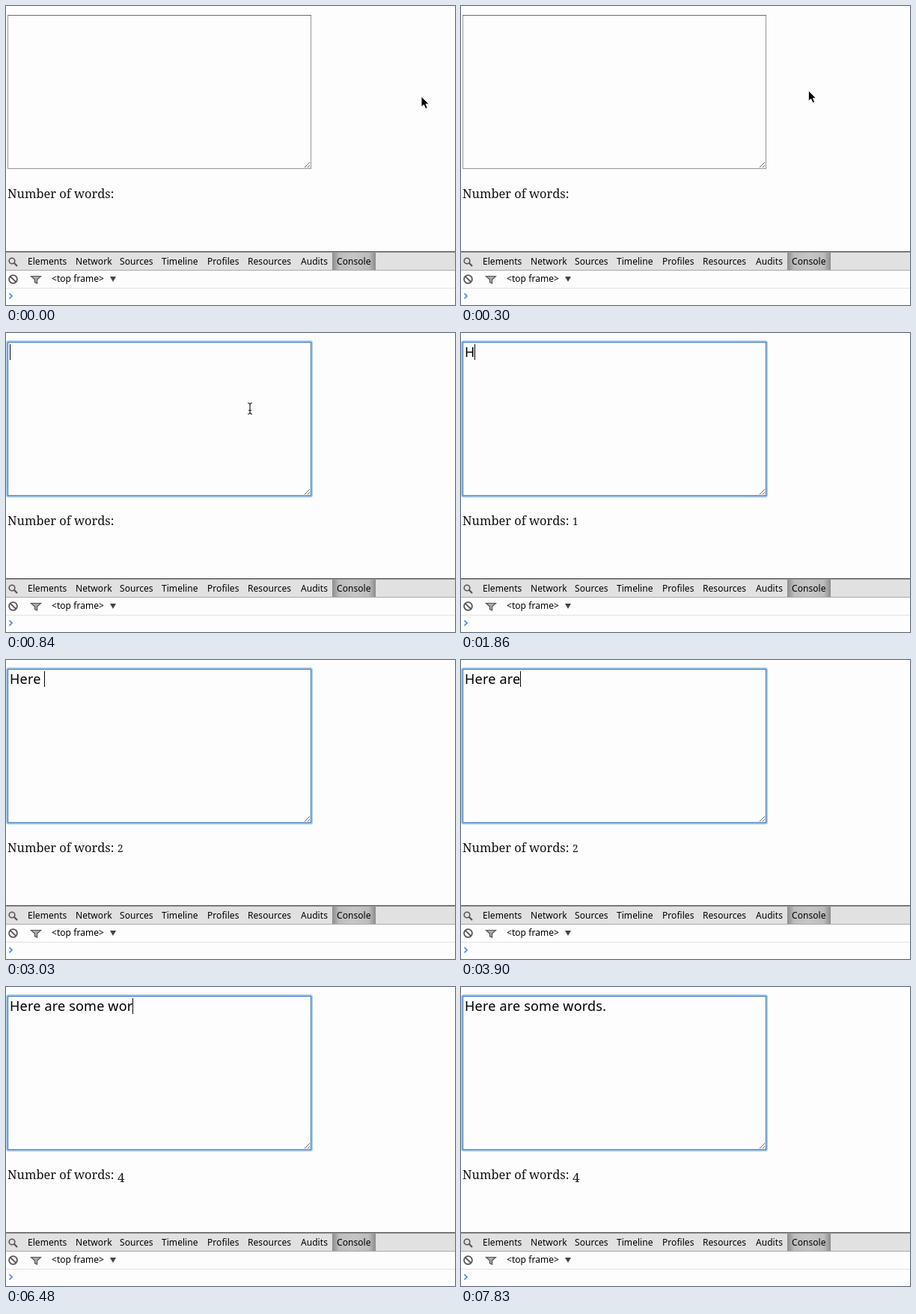
An HTML page for the animation above (8 s loop, 600 px wide and 400 px high).

```html
<!DOCTYPE html>
<html lang="en">
<head>
<meta charset="utf-8">
<title>Word counter</title>
<style>
  html, body { margin: 0; width: 100%; height: 100%; overflow: hidden; background: #fdfdfd; }
  svg { position: absolute; left: 0; top: 0; width: 600px; height: 400px; display: block; }
  text { white-space: pre; fill: #000; }
  .ui { font: 12px "Noto Sans", sans-serif; letter-spacing: .05px; }
  .typed { font: 18px "Noto Sans", sans-serif; letter-spacing: .2px; }
  .label { font: 16.4px "Noto Serif", serif; fill: #111; }
</style>
</head>
<body>
<svg viewBox="0 0 600 400">
  <defs>
    <linearGradient id="tab">
      <stop offset="0" stop-color="#8c8c8c"/>
      <stop offset=".16" stop-color="#bdbdbd"/>
      <stop offset=".5" stop-color="#c6c6c6"/>
      <stop offset=".84" stop-color="#bdbdbd"/>
      <stop offset="1" stop-color="#8c8c8c"/>
    </linearGradient>
  </defs>

  <g fill="none">
    <g id="plain">
      <rect x="2.5" y="12.5" width="405" height="205" stroke="#959595"/>
      <path d="M2 12.5H408" stroke="#6c6c6c"/>
    </g>
    <g id="focus">
      <rect x="1.5" y="11.5" width="407" height="207" rx="2" stroke="#a9c8ea" stroke-width="3"/>
      <rect x="2.5" y="12.5" width="405" height="205" stroke="#4f87c2" stroke-width="1.3"/>
    </g>
    <path d="M399 216L406 209M403 216L406 213" stroke="#666"/>
  </g>

  <text id="typed" class="typed" x="5" y="32"></text>
  <path id="caret" d="M.5 15V36" stroke="#000"/>

  <text class="label" x="2" y="257">Number of words:</text>
  <text id="count" class="label" x="149"></text>

  <rect y="329" width="600" height="24" fill="#e2e1e2"/>
  <path d="M0 328.8H600" stroke="#565656" stroke-width="1.6"/>
  <path d="M0 353.5H600" stroke="#a8a8a8"/>
  <path d="M0 377.5H600" stroke="#e2e2e2"/>
  <rect x="436" y="330" width="58" height="23" fill="url(#tab)"/>
  <g id="tabs" class="ui"></g>
  <text class="ui" x="61" y="369">&lt;top frame&gt;</text>
  <path d="M139 362H147L143 369Z" fill="#444"/>

  <g fill="none" stroke="#555">
    <circle cx="8" cy="341" r="3.8" stroke-width="1.6"/>
    <path d="M10.8 343.8L15 348" stroke-width="2.2"/>
    <circle cx="9.5" cy="365.5" r="5.4" stroke-width="1.8"/>
    <path d="M5.8 361.8L13.2 369.2" stroke-width="1.8"/>
    <path d="M33.5 361.5H46.5L41.6 366V371L38.4 369.5V366Z" fill="#aaa" stroke-width="1.2"/>
    <path d="M4.5 384.5L8 388L4.5 391.5" stroke="#4a86d8" stroke-width="1.7"/>
  </g>

  <path id="arrow" d="M0 0V14.2L3.3 11.2L5.7 16.6L8.3 15.4L6 10.2H10.2Z" fill="#000" stroke="#fff" stroke-width="1"/>
  <g id="beam" fill="none">
    <path d="M-3 -7.5Q0 -7.5 0 -5Q0 -7.5 3 -7.5M0 -5V5M-3 7.5Q0 7.5 0 5Q0 7.5 3 7.5M-2 2.5H2" stroke="#222" stroke-width="1.2"/>
  </g>
</svg>
<script>
const LOOP = 8000, FOCUS = 750, BLINK = 450;
const TEXT = "Here are some words.";
// Time at which each character appears
const KEYS = [1800, 2100, 2250, 2520, 3030, 3600, 3750, 3900, 4320, 4530,
              4770, 5010, 5430, 5850, 6180, 6330, 6480, 6690, 6990, 7380];
const TABS = { Elements: 29, Network: 93, Sources: 152, Timeline: 208,
               Profiles: 269, Resources: 323, Audits: 394, Console: 442 };
const START = [555, 121], END = [326, 101];

const $ = id => document.getElementById(id);
const show = (id, on) => $(id).setAttribute("visibility", on ? "visible" : "hidden");
const move = (id, x, y) => $(id).setAttribute("transform", `translate(${x} ${y})`);

for (const [name, x] of Object.entries(TABS)) {
  const tab = document.createElementNS("http://www.w3.org/2000/svg", "text");
  tab.setAttribute("x", x);
  tab.setAttribute("y", 346);
  tab.textContent = name;
  $("tabs").append(tab);
}

const pen = document.createElement("canvas").getContext("2d");
pen.font = '18px "Noto Sans", sans-serif';
const caretX = n => Math.round(4.6 + pen.measureText(TEXT.slice(0, n)).width + n * .2);

function drawPointer(t) {
  const p = Math.min(1, Math.max(0, (t - 30) / 630));
  const e = p * p * (3 - 2 * p);
  const [x, y] = START.map((v, i) => v + (END[i] - v) * e);
  const inside = x < 408;
  move("arrow", x, y);
  move("beam", x, y);
  show("arrow", !inside);
  show("beam", inside && t < KEYS[0]);
}

function drawCount(typed) {
  const words = typed ? typed.split(" ").length : 0;
  const count = $("count");
  count.textContent = words || "";
  // Old-style figures: 1 and 2 sit at x-height, 3 and 4 descend
  const small = words < 3;
  count.style.fontSize = small ? "13.5px" : "17px";
  count.setAttribute("y", small ? 257 : 260.5);
}

function draw(t) {
  const n = KEYS.filter(k => k <= t).length;
  const typed = TEXT.slice(0, n);
  const last = n ? KEYS[n - 1] : FOCUS;
  const focused = t >= FOCUS;
  $("typed").textContent = typed;
  move("caret", caretX(n), 0);
  show("caret", focused && Math.floor((t - last) / BLINK) % 2 === 0);
  show("plain", !focused);
  show("focus", focused);
  drawCount(typed);
  drawPointer(t);
}

const begin = performance.now();
function tick() {
  draw((performance.now() - begin) % LOOP);
  requestAnimationFrame(tick);
}
draw(0);
requestAnimationFrame(tick);
</script>
</body>
</html>
```
